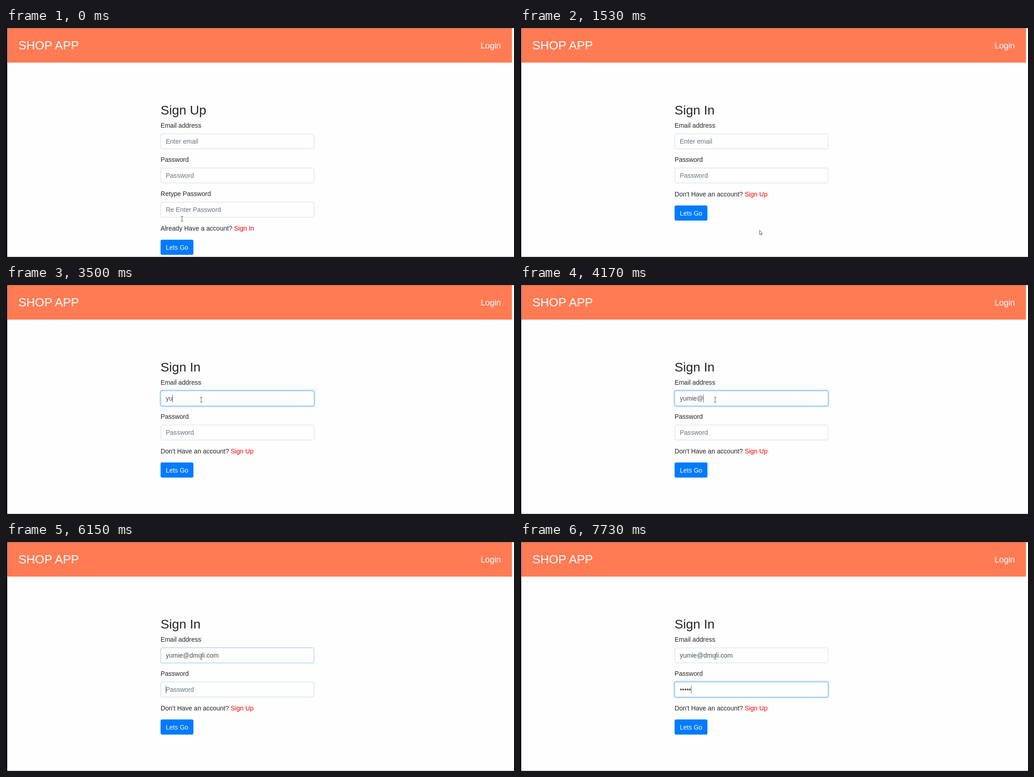
An HTML page that plays this animation: 1114 by 503 pixels, repeating every 8000 ms.

```html
<!DOCTYPE html>
<html lang="en">
<head>
<meta charset="utf-8">
<title>Shop sign in</title>
<style>
  html, body { margin: 0; width: 100%; height: 100%; overflow: hidden; background: #fefefe; }
  svg { display: block; width: 1114px; height: 503px; }
  text { font: 14.08px "Liberation Sans", Arial, sans-serif; fill: #212529; white-space: pre; }
  .brand { font-size: 26.4px; fill: #fff; }
  .login { font-size: 18.3px; fill: #fff; }
  .title { font-size: 28.16px; }
  .link { fill: #f00; }
  .button text { fill: #fff; }
  .button rect { fill: #007bff; }
  .field { --g: 0; }
  .halo { fill: none; stroke: rgb(0 123 255 / calc(var(--g) * .25)); stroke-width: calc(var(--g) * 5.6px); }
  .box { fill: #fefefe; stroke: color-mix(in srgb, #80bdff calc(var(--g) * 100%), #d5dadf); }
  .field .hint { fill: #6c757d; }
  .field .value { fill: #495057; }
  .caret { fill: #5c636a; }
  .pointer { fill: #fff; stroke: #444; stroke-width: .9; stroke-linejoin: round; }
  .beam { fill: none; stroke: #555; }
</style>
</head>
<body>
<svg viewBox="0 0 1114 503">
  <rect width="1114" height="503" fill="#fefefe"/>
  <rect x="3" width="1106.5" height="76" fill="#ff7b54"/>
  <rect width="1114" height="1" fill="#666" opacity=".5"/>
  <rect y="502" width="1114" height="1" fill="#b4b4b4"/>
  <rect width="2.6" height="503"/>
  <text class="brand" x="26.9" y="47">SHOP APP</text>
  <text class="login" x="1040.7" y="44.5">Login</text>

  <text class="title" id="title" x="339" y="190"></text>
  <g id="fields"></g>
  <g id="foot">
    <text x="339" y="370"><tspan id="ask"></tspan><tspan class="link" id="link"></tspan></text>
    <g class="button">
      <rect x="339" y="389.7" width="72" height="33.3" rx="3.5"/>
      <text x="350.4" y="411.5">Lets Go</text>
    </g>
  </g>
  <rect class="caret" id="caret" width="1" height="17"/>
  <g id="cursor">
    <path class="beam" id="beam" d="M-2.5-5.5H-.7L0-5 .7-5.5H2.5M0-5V5M-2.5 5.5H-.7L0 5 .7 5.5H2.5"/>
    <path class="pointer" id="arrow" d="M.4.4V9.6L2.5 7.7 4 11 5.6 10.3 4.2 7.1H6.7Z"/>
    <path class="pointer" id="hand" d="M-1 7V1Q0-.6 1 1V5L5 6Q6.4 6.4 6.2 8L5.3 12.5H-.5L-3.6 8.2Q-3.6 6.6-2.2 6.9L-1 8Z"/>
  </g>
</svg>
<script>
const LOOP = 8000;
const EMAIL = "yumie@dmuli.com";
const $ = id => document.getElementById(id);

const emailKeys = [3110, 3500, 3620, 3740, 4020, 4170, 4570, 4970,
                   5090, 5210, 5490, 5610, 5730, 5880, 6030];
const passKeys = [6810, 7210, 7360, 7610, 7730];

// time, shape, x, y
const moves = [
  [0, "beam", 386, 419], [130, "arrow", 400, 438], [250, "arrow", 418, 461],
  [400, "arrow", 465, 483], [520, "arrow", 510, 456], [670, "hand", 528, 441],
  [790, "hand", 525, 444], [1410, "arrow", 525, 444], [1650, "arrow", 511, 430],
  [1770, "arrow", 471, 380], [2040, "arrow", 424, 299], [2190, "beam", 428, 275],
  [2310, "beam", 428, 252]
];
const emailGlow = [[0, 0], [2580, .5], [2700, 1], [6150, .5], [6280, 0]];
const passGlow = [[0, 0], [6150, .12], [6280, 1]];

function makeField(y, label, hint) {
  const rect = `x="339.5" y="${y + .5}" width="336" height="33" rx="3.5"`;
  const g = document.createElementNS("http://www.w3.org/2000/svg", "g");
  g.innerHTML = `<text x="339" y="${y - 13}">${label}</text>
    <g class="field"><rect class="halo" ${rect}/><rect class="box" ${rect}/>
    <text class="hint" x="350.4" y="${y + 22}">${hint}</text>
    <text class="value" x="350.4" y="${y + 22}"></text></g>`;
  $("fields").append(g);
  const find = name => g.querySelector(name);
  return { g, y, box: find(".field"), hint: find(".hint"), value: find(".value") };
}

const email = makeField(232, "Email address", "Enter email");
const pass = makeField(307, "Password", "Password");
const again = makeField(382, "Retype Password", "Re Enter Password");

const latest = (list, t) => list.findLast(step => step[0] <= t);
const typed = (keys, t) => keys.filter(k => k <= t).length;
const show = (el, on) => el.setAttribute("visibility", on ? "visible" : "hidden");

function fill(field, text, glow) {
  field.value.textContent = text;
  show(field.hint, !text);
  field.box.style.setProperty("--g", glow);
}

function draw(t) {
  const signUp = t < 1410;
  $("title").textContent = signUp ? "Sign Up" : "Sign In";
  $("ask").textContent = signUp ? "Already Have a account? " : "Don't Have an account? ";
  $("link").textContent = signUp ? "Sign In" : "Sign Up";
  $("foot").setAttribute("transform", `translate(0 ${signUp ? 75.3 : 0})`);
  show(again.g, signUp);
  show(again.hint, signUp);

  fill(email, EMAIL.slice(0, typed(emailKeys, t)), latest(emailGlow, t)[1]);
  fill(pass, "•".repeat(typed(passKeys, t)), latest(passGlow, t)[1]);

  const active = t < 6150 ? email : pass;
  const len = active.value.textContent ? active.value.getComputedTextLength() : 0;
  $("caret").setAttribute("x", Math.round(350.4 + len));
  $("caret").setAttribute("y", active.y + 8.5);
  show($("caret"), t >= 2430);

  const [, shape, x, y] = latest(moves, t);
  for (const id of ["beam", "arrow", "hand"]) show($(id), id === shape);
  $("cursor").setAttribute("transform", `translate(${x} ${y})`);
}

const start = performance.now();
function tick() {
  draw((performance.now() - start) % LOOP);
  requestAnimationFrame(tick);
}
tick();
</script>
</body>
</html>
```
